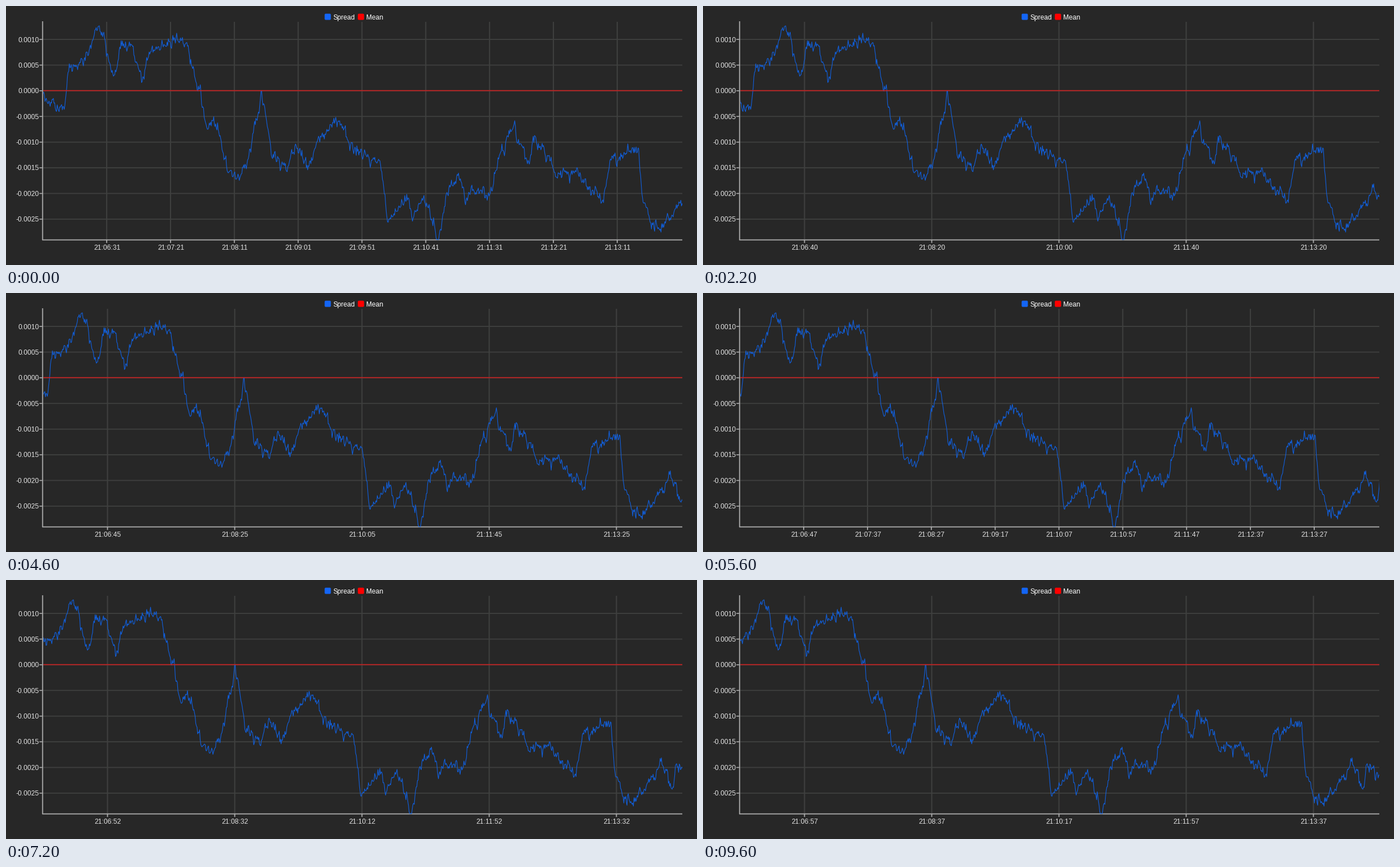
A matplotlib script that plays this animation: 1222 by 458 pixels, repeating every 10000 ms.

```python
import math

import numpy as np
import matplotlib.pyplot as plt
from matplotlib.animation import FuncAnimation
from matplotlib.patches import FancyBboxPatch, Rectangle

W, H, DPI = 1222, 458, 100
PX = 72 / DPI  # points per pixel
LEFT, RIGHT, TOP, BOTTOM = 65, 1196, 28, 413
MID = 629.5  # the middle time label stays here
BASE_TIME = 21 * 3600 + 9 * 60 + 51
STEP = 50  # seconds between dense grid lines
WIDE_GAP, TIGHT_GAP = 112.85, 112.5  # pixels per step

BG, GRID, AXIS, TEXT = "#272727", "#3f403f", "#adadad", "#e2e2e2"
BLUE, RED = "#1465f5", "#ff0000"

# The chart refreshes about once a second
REFRESH = 10.1  # frames
SCROLLED = [0, 3, 5, 9, 12, 14, 16, 19, 21, 24, 26]  # seconds, per refresh
DENSE = {0, 1, 2, 6}  # refreshes that label every step

# Main turns of the spread before scrolling, in pixels
TURNS = [
    (66, 160), (92, 192), (104, 178), (111, 108), (140, 97), (164, 30),
    (191, 129), (204, 74), (221, 68), (241, 136), (253, 86), (290, 57),
    (322, 76), (355, 214), (370, 202), (391, 284), (413, 306), (428, 272),
    (452, 153), (472, 268), (495, 288), (513, 250), (537, 283), (550, 246),
    (578, 208), (596, 218), (614, 258), (662, 280), (675, 388), (705, 340),
    (722, 372), (735, 336), (765, 410), (778, 334), (800, 300), (812, 332),
    (855, 328), (873, 268), (899, 214), (925, 280), (932, 232), (976, 300),
    (1001, 296), (1056, 338), (1070, 270), (1106, 253), (1119, 258),
    (1126, 344), (1142, 378), (1160, 394), (1206, 326), (1227, 374),
    (1234, 324), (1257, 350),
]


def make_series():
    """Seconds relative to the base time, and heights with jitter."""
    rng = np.random.default_rng(7)
    x = np.arange(60, 1262, 1.13)
    jitter = np.zeros(len(x))
    for i in range(1, len(x)):
        jitter[i] = 0.55 * jitter[i - 1] + rng.normal(0, 5.6)
    y = np.interp(x, *zip(*TURNS)) + jitter
    return (x - MID) * STEP / WIDE_GAP, np.clip(y, TOP, BOTTOM)


def clock(seconds):
    return f"{seconds // 3600:02d}:{seconds // 60 % 60:02d}:{seconds % 60:02d}"


plt.rcParams["font.family"] = "Liberation Sans"
plt.rcParams["path.simplify"] = False
fig = plt.figure(figsize=(W / DPI, H / DPI), dpi=DPI, facecolor=BG)
ax = fig.add_axes([0, 0, 1, 1])
ax.set_xlim(0, W)
ax.set_ylim(H, 0)
ax.axis("off")


def stroke(xs, ys, color, width, z):
    return ax.plot(xs, ys, color=color, lw=width * PX, zorder=z, snap=False,
                   solid_capstyle="butt")[0]


def label(x, y, text, color=TEXT, ha="left"):
    return ax.text(x, y, text, color=color, fontsize=12 * PX, ha=ha,
                   va="baseline", zorder=6)


def legend_item(x, text, text_x, color):
    ax.add_patch(FancyBboxPatch((x, 13.6), 11, 11, fc=color, ec="none",
                                boxstyle="round,pad=0,rounding_size=2"))
    label(text_x, 24, text, "white")


legend_item(563.5, "Spread", 579, BLUE)
legend_item(622.2, "Mean", 637.5, RED)

for k in range(8):
    y = 59.1 + 45.4 * k
    stroke([LEFT, RIGHT], [y, y], GRID, 1.8, 1)
    stroke([59, LEFT], [y, y], AXIS, 1.6, 3)
    label(59, y + 4.4, f"{(2 - k) * 0.0005:.4f}", ha="right")

stroke([64.7, 64.7], [27, 414], AXIS, 1.8, 3)
stroke([64, RIGHT], [413.6, 413.6], AXIS, 1.8, 3)

seconds, heights = make_series()
spread = stroke([], [], "#1060e0", 1.1, 4)
spread.set_clip_path(Rectangle((LEFT + 1, 0), RIGHT - LEFT - 1, H,
                               transform=ax.transData))
stroke([LEFT + 1, RIGHT], [149.6, 149.6], "#c92222", 1.7, 5)

columns = []
for k in range(-4, 5):
    columns.append((k, stroke([], [], GRID, 2, 1),
                    stroke([], [], AXIS, 1.8, 3),
                    label(0, 430.7, "", ha="center")))


def draw(frame):
    refresh = math.ceil((frame - 0.4) / REFRESH)
    scroll, dense = SCROLLED[refresh], refresh in DENSE
    gap = WIDE_GAP if dense else TIGHT_GAP
    spread.set_data(MID + (seconds - scroll) * gap / STEP, heights)
    for k, line, tick, text in columns:
        x = MID + k * gap
        line.set_data([x, x], [TOP, BOTTOM])
        tick.set_data([x, x], [BOTTOM, 419])
        text.set_x(x + 0.5)
        text.set_text(clock(BASE_TIME + scroll + STEP * k))
        for part in (line, tick, text):
            part.set_visible(dense or k % 2 == 0)
    return []


anim = FuncAnimation(fig, draw, frames=100, interval=100, repeat=True)
plt.show()
```
